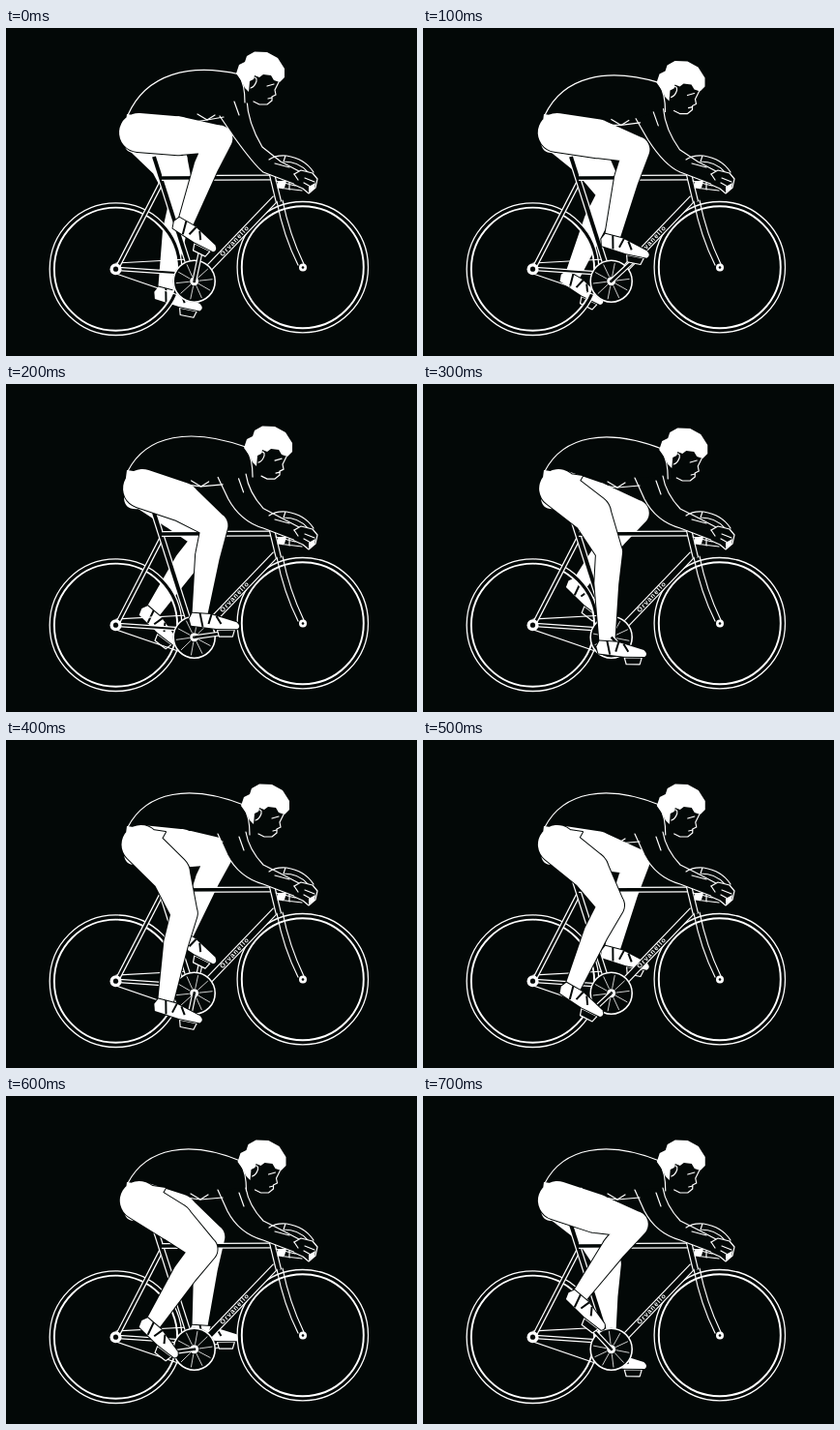
An HTML page that plays this animation: 425x339 px, repeating every 0.8 s.

```html
<!DOCTYPE html>
<html lang="en">
<head>
<meta charset="utf-8">
<title>Cyclist</title>
<style>
  html, body { margin: 0; width: 100%; height: 100%; overflow: hidden; background: #030807; }
  svg { display: block; width: 100%; height: 100%; }
  .w { fill: #fff; }
  .k { fill: #030807; }
  .l { fill: none; stroke: #fff; stroke-width: 1.2; stroke-linejoin: round; stroke-linecap: round; }
  .d { fill: none; stroke: #030807; stroke-width: 2; }
  .edge { fill: #fff; stroke: #030807; stroke-width: 2; paint-order: stroke; stroke-linejoin: round; }
  .pose { visibility: hidden; animation: show .8s step-end infinite; }
  @keyframes show { 0% { visibility: visible; } 12.5%, 100% { visibility: hidden; } }
  text { font: bold 7px "Liberation Sans", Arial, sans-serif; letter-spacing: 1px; fill: #fff; }
</style>
</head>
<body>
<svg viewBox="0 0 425 339">
  <g id="far"></g>
  <g id="bike"></g>
  <g id="near"></g>
</svg>
<script>
const STEPS = 8, CRANK = 33, THIGH = 84, CALF = 92;
const BB = [194.7, 261.7];
const rad = deg => deg * Math.PI / 180;

// Points are [x, y]; go() moves a point along a direction.
const go = (p, dir, n) => [p[0] + dir[0] * n, p[1] + dir[1] * n];
const polar = deg => [Math.cos(rad(deg)), Math.sin(rad(deg))];
const mix = (a, b, t) => a.map((v, i) => v + (b[i] - v) * t);
const unit = (a, b) => {
  const len = Math.hypot(b[0] - a[0], b[1] - a[1]);
  return [(b[0] - a[0]) / len, (b[1] - a[1]) / len];
};
const front = ([x, y]) => [y, -x];

const path = (d, cls = 'l') => `<path class="${cls}" d="${d}"/>`;
const stroke = (d, color, width) => `<path d="${d}" fill="none" stroke="${color}" stroke-width="${width}"/>`;
const tube = (d, w) => stroke(d, '#fff', w) + stroke(d, '#030807', w - 2.4);
const dot = ([x, y], r, cls) => `<circle class="${cls}" cx="${x}" cy="${y}" r="${r}"/>`;
const ring = ([x, y], r, w, color = '#fff') =>
  `<circle cx="${x}" cy="${y}" r="${r}" fill="none" stroke="${color}" stroke-width="${w}"/>`;
const place = ([x, y], turn, body) => `<g transform="translate(${x},${y}) rotate(${turn})">${body}</g>`;

// Rounded limb segment with radius r at p and s at q.
function taper(p, r, q, s) {
  const n = front(unit(p, q));
  return `M${go(p, n, r)}L${go(q, n, s)}A${s},${s} 0 0 1 ${go(q, n, -s)}L${go(p, n, -r)}A${r},${r} 0 0 1 ${go(p, n, r)}Z`;
}

// Pedal stroke at a given step: angle slightly uneven, toe drops on the way up.
const crankAngle = step => 45 * step - 88 + 10 * Math.cos(rad(90 * step));
const footTilt = step => 19 + 20 * Math.cos(rad(45 * (step - 6.5)));

// The rider starts sitting up, then settles low.
function lean(step) {
  const low = Math.min(1, step / 2.2);
  const sway = Math.sin(rad(45 * step)) ** 3;
  return { low, dx: 5 * low + 3.5 * sway, dy: 21 * low };
}

function leg(step, dx) {
  const hip = [137 + dx / 2, 108];
  const pedal = go(BB, polar(crankAngle(step)), CRANK);
  const tilt = footTilt(step);
  const toe = polar(tilt);
  const ankle = go(go(pedal, toe, -27), front(toe), 20);

  const down = unit(hip, ankle);
  const reach = Math.hypot(ankle[0] - hip[0], ankle[1] - hip[1]);
  const along = (THIGH ** 2 - CALF ** 2 + reach ** 2) / (2 * reach);
  const out = Math.sqrt(Math.max(0, THIGH ** 2 - along ** 2));
  const knee = go(go(hip, down, along), front(down), out);

  const bulge = 30 * (reach / (THIGH + CALF) - .6);
  const thigh = go(mix(hip, knee, .5), front(unit(hip, knee)), bulge);
  const calf = go(mix(knee, ankle, .35), front(unit(knee, ankle)), -2);
  const outline = taper(hip, 20, thigh, 20) + taper(thigh, 20, knee, 13.5) +
    taper(knee, 13.5, calf, 12.5) + taper(calf, 12.5, ankle, 8);
  return { pedal, tilt, outline };
}

const crank = ({ pedal }) => tube(`M${BB}L${pedal}`, 5);

const foot = ({ pedal, tilt }) => place(pedal, tilt,
  path('M-9,-3H9L7,4H-7Z', 'k') + path('M-9,-3H9L7,4H-7Z') +
  path('M-38,-14L-35,-20L-16,-19Q-2,-15 11,-11Q16,-7 12,-4H-10L-36,-7Z', 'edge') +
  path('M-27,-20L-24,-6M-15,-19L-18,-9M-10,-17L-5,-9', 'd'));

const wheel = (hub, r) =>
  ring(hub, r - 2.3, 4.6, '#030807') + ring(hub, r, 1.3) + ring(hub, r - 4.7, 1.9);

function bike() {
  const rear = [113.5, 249.2], fork = [307, 247.5];
  return wheel(rear, 68.3) + wheel([306.8, 247.2], 67.7) +
    path('M122,117Q122,131 138,129L157,134L150,122Z', 'w') +
    path('M114,243L188,239M114,254L178,276') +
    tube('M116,249L190,254', 4.4) +
    tube('M162,157L116,246', 5) +
    tube('M153,133L193,258', 6.4) +
    tube('M161,155L276,154.5', 6) +
    tube('M279,176L207,251', 8) +
    place([224, 236.5], -47, '<text>Orvanello</text>') +
    tube('M275,151L282,180', 6.5) +
    path('M280,179Q287,215 302,245M286,178Q293,213 308,244') +
    dot(fork, 4, 'w') + dot(fork, 1.3, 'k') +
    dot(rear, 6, 'w') + dot(rear, 2.6, 'k') +
    dot(BB, 22, 'k') + ring(BB, 21.5, 1.6);
}

function spokes(step) {
  let d = '';
  for (let a = 0; a < 360; a += 36) {
    const dir = polar(crankAngle(step) + a);
    d += `M${go(BB, dir, 5)}L${go(BB, dir, 19)}`;
  }
  return stroke(d, '#fff', .8) + dot(BB, 4.5, 'w') + dot(BB, 1.6, 'k');
}

const head = ({ dx, dy }) => place([dx, dy], 0,
  path('M243,54L262,45L281,50L282,58L278,69L270,79L256,80L248,77Z', 'k') +
  path('M238,47L241,38L247,35L249,29L257,24.5L270,25L281,31L288,42L288,51L283,56L277,54L274,49L266,48L262,51L257,49L256,53L252,55L251,66L247,62L243,54Z', 'w') +
  path('M282,56L278,64L279,69L275,71L275,75L270,79L262,79L256,76M253,52Q260,49 259,55Q257,61 253,62') +
  path('M270,60L277,58M271,73L275,72M241,49Q247,58 247,77'));

function torso({ low, dx, dy }) {
  const at = (x, y, x2, y2) => mix([x, y], [x2, y2], low);
  const shoulder = at(249, 74, 248, 95), armpit = at(221, 91, 219, 97);
  const belly = at(188, 98, 172, 103), fold = at(208, 95, 201, 107);
  const upper = `M${shoulder}Q${at(250, 98, 251, 113)} ${at(265, 123, 266, 129)}L284,138L303,148`;
  const elbow = `Q${at(257, 142, 241, 142)} 266,149`;
  const bend = at(236, 113, 229, 119);
  return path(`${upper}L300,162L266,149${elbow.replace(' 266,149', '')} ${bend}L${armpit}Z`, 'k') +
    path(`M126,90C145,${47 + dy * .3} 190,${36 + dy * .42} ${242 + dx},${48 + dy * .93}`) +
    path(upper) + path(`M${armpit}L${bend}${elbow}L300,162`) +
    path(`M${belly}L${fold}L${at(225, 92, 224, 105)}`) +
    path(`M${fold}l-10,-6M${fold}l8,-5M${at(236, 76, 241, 100)}l5,14`);
}

const fist = 'M298,151L305,147L317,150L322,156L320,165L313,171L307,166L298,162';
const grip =
  path('M272,136Q279,131 290,132Q309,135 318,149M287,138Q303,138 312,149M289,132L287,138') +
  path('M278,140L293,144M279,158L299,163M281,165L306,168M286,158V166M293,160V167') +
  path('M281,158H290L288,165H281Z', 'w') +
  path(fist, 'k') + path(fist) + path('M309,155L319,159M308,160L317,165M298,151L302,157') +
  path('M313,164L320,160L319,166L313,170Z', 'w');

const waist = 'M125,89L165,95L150,122L122,112Z';
const layers = { far: '', near: '' };

for (let i = 0; i < STEPS; i++) {
  const body = lean(i), right = leg(i, body.dx), left = leg(i + STEPS / 2, body.dx);
  const add = (id, html) => {
    layers[id] += `<g class="pose" style="animation-delay:${(i - STEPS) * 100}ms">${html}</g>`;
  };
  add('far', path(left.outline, 'w') + crank(left) + foot(left));
  add('near', spokes(i) + path(right.outline + waist, 'edge') + crank(right) + foot(right) +
    torso(body) + head(body) + grip);
}

layers.bike = bike();
for (const id in layers) document.getElementById(id).innerHTML = layers[id];
</script>
</body>
</html>
```
